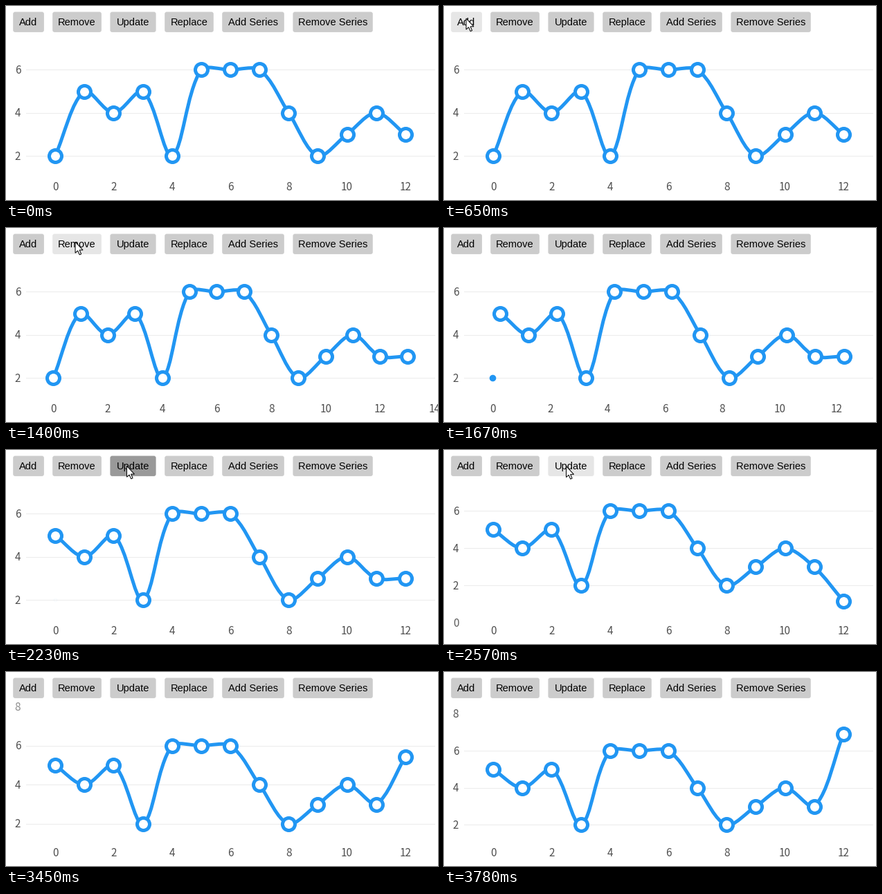
These frames come from a looping animation (624x281 px, 4280 ms). A matplotlib script:

```python
import matplotlib.pyplot as plt
import numpy as np
from matplotlib.animation import FuncAnimation
from matplotlib.patches import FancyBboxPatch, PathPatch, Polygon
from matplotlib.path import Path

W, H, DPI = 624, 281, 100
LOOP, STEP = 4280, 20
PX = 72 / DPI
BLUE = "#2196f3"
NORMAL, HOVER, PRESSED = "#cccccc", "#e6e6e6", "#999999"

LEFT, RIGHT, TOP, BOTTOM = 29, 619, 61.3, 248.1
SMOOTH, SPEED = 0.65, 800
DOT, STROKE = 18, 5

# The screen refreshes in steps of roughly 68 ms.
TICK_TIMES = [500, 990, 1600, 2160, 2710, 3250, 3780]
TICK_COUNT = [0, 7, 16, 24, 32, 40, 48]

BUTTONS = [("Add", 10.2, 54.9), ("Remove", 67.2, 137.9), ("Update", 150.4, 216.6),
           ("Replace", 229.2, 299.8), ("Add Series", 312.2, 401.8),
           ("Remove Series", 414.4, 529.8)]
BTN_TOP, BTN_BOTTOM = 8.5, 37.9

# Each visit of the pointer: (time, x, y)
VISITS = [
    [(500, 30, 2), (640, 32, 18), (718, 32, 22), (850, 34, 14), (930, 36, 1)],
    [(1180, 100, 2), (1390, 100, 20), (1513, 101, 23), (1600, 104, 6)],
    [(1960, 160, 2), (2090, 172, 20), (2230, 174.5, 23.2), (2570, 176.5, 23.5),
     (3040, 179.5, 23), (3330, 180, 24), (3440, 180, 24)],
]
ARROW = np.array([(0, 0), (0, 16), (3.6, 12.7), (6.2, 18.6), (8.6, 17.5),
                  (6.1, 11.8), (11, 11.8)])


def view(count, lo, hi):
    """Axis state: x origin, x step, y origin, y step, opacity of labels 0 and 8."""
    sx = (RIGHT - LEFT) / (count + 1)
    sy = (TOP - BOTTOM) / (hi - lo)
    return np.array([LEFT + sx, sx, BOTTOM - lo * sy, sy, lo <= 0, hi >= 8], float)


def spline(values, axes):
    """Rows of (control, control, point) in pixels."""
    pts = np.column_stack([np.arange(len(values)), values]).astype(float)
    pad = np.vstack([pts[:1], pts, pts[-1:]])
    mid = (pad[1:] + pad[:-1]) / 2
    size = np.hypot(*(pad[1:] - pad[:-1]).T)
    k = (size[:-1] / (size[:-1] + size[1:]))[:, None]
    base = mid[:-1] + (mid[1:] - mid[:-1]) * k
    leave = pts + (mid[1:] - base) * SMOOTH
    enter = pts + (mid[:-1] - base) * SMOOTH
    rows = np.stack([np.roll(leave, 1, axis=0), enter, pts], axis=1)
    return rows * axes[[1, 3]] + axes[[0, 2]]


def ease(ms):
    return 1.0 if ms >= SPEED else 1 - 2 ** (-10 * max(ms, 0) / SPEED)


FIRST = [2, 5, 4, 5, 2, 6, 6, 6, 4, 2, 3, 4, 3]
ADDED = FIRST + [3]
KEPT = ADDED[1:]
ADD, REMOVE = 718, 1513
EVENTS = [
    (ADD, ADDED, view(14, 1, 7)),
    (REMOVE, KEPT, view(13, 1, 7)),
    (2279, KEPT[:-1] + [1], view(13, 0, 7)),
    (2710, KEPT[:-1] + [3], view(13, 1, 7)),
    (3329, KEPT[:-1] + [7], view(13, 1, 8)),
]
CLICKS = [e[0] for e in EVENTS]


def chart_state(t):
    axes = view(13, 1, 7)
    rows = spline(FIRST, axes)
    for (start, values, goal), end in zip(EVENTS, CLICKS[1:] + [LOOP]):
        if t < start:
            break
        if len(values) > len(rows):
            rows = spline(values, axes)
        elif len(values) < len(rows):
            rows = rows[1:]
        p = ease(min(t, end) - start)
        rows = rows + p * (spline(values, goal) - rows)
        axes = axes + p * (goal - axes)
    return rows, axes


def pointer(t):
    for visit in VISITS:
        times, xs, ys = zip(*visit)
        if times[0] <= t <= times[-1]:
            return np.interp(t, times, xs), np.interp(t, times, ys)
    return None


def tick(t):
    if t < TICK_TIMES[0]:
        return 0
    k = np.floor(np.interp(t, TICK_TIMES, TICK_COUNT) + 0.1)
    return np.interp(k, TICK_COUNT, TICK_TIMES)


fig = plt.figure(figsize=(W / DPI, H / DPI), dpi=DPI, facecolor="white")
ax = fig.add_axes([0, 0, 1, 1])
ax.set_xlim(0, W)
ax.set_ylim(H, 0)
ax.axis("off")


def label(text, color, size, font, x=0, y=0):
    return ax.text(x, y, text, color=color, fontsize=size * PX, family=font,
                   ha="center", va="baseline", zorder=5)


def dots():
    line, = ax.plot([], [], "o", ms=DOT * PX, mew=STROKE * PX, mfc="white",
                    mec=BLUE, zorder=4)
    line.set_snap(False)
    return line


boxes = []
for name, x0, x1 in BUTTONS:
    box = FancyBboxPatch((x0, BTN_TOP), x1 - x0, BTN_BOTTOM - BTN_TOP,
                         boxstyle="round,pad=0,rounding_size=3", fc=NORMAL, lw=0)
    boxes.append(ax.add_patch(box))
    label(name, "black", 14.6, "Liberation Sans", (x0 + x1) / 2, 28)

x_labels = {i: label(str(i), "#505050", 15.3, "Noto Sans CJK JP", y=267)
            for i in range(0, 15, 2)}
y_labels = {v: label(str(v), "#505050", 15.3, "Noto Sans CJK JP", x=17)
            for v in range(0, 9, 2)}
grid = {v: ax.plot([LEFT, RIGHT], [0, 0], color="#ebebeb", lw=PX, zorder=1)[0]
        for v in y_labels}

curve = ax.add_patch(PathPatch(Path([(0, 0)]), fc="none", ec=BLUE, lw=STROKE * PX,
                               capstyle="butt", joinstyle="round", zorder=3))
markers, newest, gone = dots(), dots(), dots()
arrow = ax.add_patch(Polygon(ARROW, closed=True, fc="white", ec="black",
                             lw=PX, zorder=9))


def draw_buttons(t):
    tip = pointer(t)
    arrow.set_visible(tip is not None)
    if tip is not None:
        arrow.set_xy(ARROW + tip)
    down = any(c - 70 <= t < c for c in CLICKS)
    for box, (_, x0, x1) in zip(boxes, BUTTONS):
        over = tip is not None and x0 <= tip[0] <= x1 and BTN_TOP <= tip[1] <= BTN_BOTTOM
        box.set_facecolor((PRESSED if down else HOVER) if over else NORMAL)


def draw_axes(axes):
    x0, sx, y0, sy, zero, eight = axes
    for i, text in x_labels.items():
        text.set_x(x0 + sx * i)
    for v, text in y_labels.items():
        y = y0 + sy * v
        text.set_y(y + 5.6)
        text.set_alpha({0: zero, 8: eight}.get(v, 1))
        grid[v].set_ydata([y, y])
        grid[v].set_visible(TOP < y < BOTTOM)


def draw_series(t, rows, axes):
    verts = rows.reshape(-1, 2)[2:]
    codes = [Path.MOVETO] + [Path.CURVE4] * (len(verts) - 1)
    curve.set_path(Path(verts, codes))
    pts = rows[:, 2]
    markers.set_data(pts[:-1, 0], pts[:-1, 1])
    newest.set_data(pts[-1:, 0], pts[-1:, 1])
    newest.set_markersize(DOT * PX * (ease(t - ADD) if t >= ADD else 1))
    gone.set_visible(REMOVE <= t < REMOVE + SPEED)
    gone.set_data([axes[0]], [axes[2] + axes[3] * FIRST[0]])
    gone.set_markersize(DOT * PX * max(1 - ease(t - REMOVE), 0.001))


def update(i):
    t = tick((i + 0.5) * STEP)
    rows, axes = chart_state(t)
    draw_buttons(t)
    draw_axes(axes)
    draw_series(t, rows, axes)
    return []


anim = FuncAnimation(fig, update, frames=LOOP // STEP, interval=STEP,
                     repeat=True, repeat_delay=0, blit=False)
plt.show()
```
